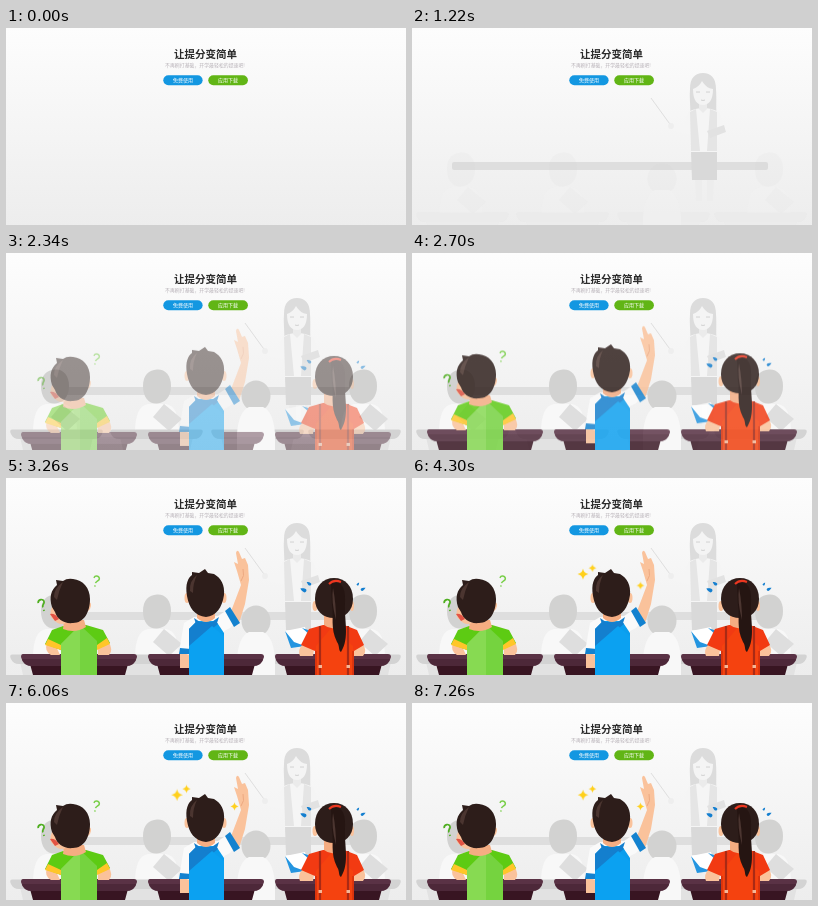
These frames come from a looping animation (400x197 px, 8000 ms). An HTML page:

```html
<!DOCTYPE html>
<html>
<head>
<meta charset="utf-8">
<title>Classroom</title>
<style>
  html, body { margin: 0; width: 100%; height: 100%; overflow: hidden; background: #f5f5f5; }
  svg { display: block; width: 100%; height: 100%; }
  text { font-family: "Noto Sans CJK SC", "Noto Sans CJK", sans-serif; text-anchor: middle; }

  .board { animation: board 8s step-end infinite; }
  .back { animation: back-fade 8s linear infinite, back-rise 8s linear infinite; }
  .front { animation: front-fade 8s linear infinite, front-rise 8s linear infinite; }
  .sparks { animation: spark-fade 8s linear infinite, spark-rise 8s linear infinite; }
  .spark { animation: pulse 8s ease-in-out infinite; }
  .skin { fill: #fac29b; }
  .hair { fill: #2d1d1a; }
  .shine { fill: #4b3530; }

  @keyframes board {
    0% { opacity: 0 } 6.25% { opacity: .55 } 6.75% { opacity: .8 } 9.75%, 100% { opacity: 1 }
  }
  @keyframes back-fade { 0%, 14.25% { opacity: 0 } 23.75%, 100% { opacity: 1 } }
  @keyframes back-rise {
    0%, 14.25% { transform: translateY(10px); animation-timing-function: cubic-bezier(.33, .67, .67, 1) }
    23.75%, 100% { transform: none }
  }
  @keyframes front-fade { 0%, 23.75% { opacity: 0 } 35.75%, 100% { opacity: 1 } }
  @keyframes front-rise {
    0%, 23.75% { transform: translateY(10px); animation-timing-function: cubic-bezier(.33, .67, .67, 1) }
    35.75%, 100% { transform: none }
  }
  @keyframes spark-fade { 0%, 40.75% { opacity: 0 } 50.75%, 100% { opacity: 1 } }
  @keyframes spark-rise {
    0%, 40.25% { transform: translateY(24px); animation-timing-function: cubic-bezier(.33, .67, .67, 1) }
    63.25%, 100% { transform: none }
  }
  @keyframes pulse {
    0%, 61.75% { transform: none }
    65.75%, 68.25% { transform: scale(.95) }
    75.75%, 83.75% { transform: scale(1.06) }
    90.75%, 100% { transform: scale(.98) }
  }
</style>
</head>
<body>
<svg viewBox="0 0 400 197" preserveAspectRatio="none">
  <defs>
    <linearGradient id="wall" x2="0" y2="1">
      <stop stop-color="#fdfdfd"/>
      <stop offset="1" stop-color="#ededed"/>
    </linearGradient>
    <path id="star" d="M0-5.5Q.9-.9 5.5 0Q.9.9 0 5.5Q-.9.9-5.5 0Q-.9-.9 0-5.5Z" fill="#ffd01c"/>
    <path id="ask" d="M-3-3C-2-7 4-6 3-2C2 0 0 0 0 2.500M0 5v1.300" fill="none" stroke-width="1.700"/>
    <path id="drop" d="M0-3.500C2.500 0 2.500 3 0 3S-2.500 0 0-3.500Z" fill="#147fd0"/>
    <g id="desk">
      <path d="M9 186H107L104 197H12Z" fill="#381522"/>
      <path d="M2 176H113Q116 176 116 179Q114 188 105 188H11Q2 188 0 179Q0 176 2 176Z" fill="#5a3245"/>
      <path d="M1 181H115Q113 188 105 188H11Q3 188 1 181Z" fill="#4d2839"/>
    </g>
    <g id="back-desk">
      <path d="M10 184H83L80 197H13Z" fill="#e2e2e2"/>
      <path d="M2 176.500H91Q94 177 92 181Q90 186 84 186H9Q3 186 1 181Q-1 177 2 176.500Z" fill="#d3d3d3"/>
    </g>
    <g id="pupil">
      <path d="M-22 180Q-22 153-9 151H9Q22 153 22 180Z" fill="#f8f8f8"/>
      <path d="M7 151L25 166L12 178L-4 164Z" fill="#dedede"/>
      <path d="M-14 133C-14 122-8 117 0 116.500S14 122 14 133S8 150 0 150.500S-14 145-14 133Z" fill="#d2d2d1"/>
    </g>
  </defs>

  <rect width="400" height="197" fill="url(#wall)"/>

  <g class="board">
    <rect x="40" y="134" width="316" height="8" rx="2" fill="#dedede"/>
    <path d="M283 150H290V173H284ZM295 150H302L301 173H295Z" fill="#ededed"/>
    <path d="M277 97C280 82 277 75 278 61C278 50 283 45 291 45S304 50 304 61C305 76 303 82 306 97Z" fill="#dcdcdc"/>
    <path d="M276 84Q291 76 307 84L314 103L305 112V126H279L278 107L258 101L260 95L272 98Z" fill="#f5f5f5"/>
    <path d="M278 84L284 81L288 123H279Z M298 81L305 84V123H295Z" fill="#e5e5e5"/>
    <path d="M287 72H295V81L291 85L287 81Z" fill="#ebebeb"/>
    <path d="M281 61Q287 59 290 53Q294 60 301 61C301 72 297 77 291 77S281 72 281 61Z" fill="#f4f4f4"/>
    <path d="M284 64H288M294 64H298M289 72Q291 73 293 72" fill="none" stroke="#d2d2d2"/>
    <path d="M239 70L260 99" stroke="#d8d8d8" stroke-width=".8"/>
    <circle cx="259" cy="98" r="3" fill="#eee"/>
    <path d="M295 103L312 97L314 104L298 110Z" fill="#e2e2e2"/>
    <path d="M279 124H305V152H280Z" fill="#d9d9d9"/>
  </g>

  <g class="back">
    <use href="#pupil" x="49"/>
    <use href="#pupil" x="151"/>
    <use href="#pupil" x="357"/>
    <use href="#back-desk" x="4"/>
    <use href="#back-desk" x="104"/>
    <use href="#back-desk" x="205"/>
    <use href="#back-desk" x="302"/>
    <ellipse cx="250" cy="143" rx="14.500" ry="15.500" fill="#d2d2d1"/>
    <path d="M231 180Q233 158 243 154H257Q267 158 269 180V197H231Z" fill="#f8f8f8"/>
  </g>

  <g class="front">
    <use href="#desk" x="15"/>
    <use href="#desk" x="142"/>
    <use href="#desk" x="269"/>

    <!-- puzzled boy -->
    <path class="skin" d="M41 165L50 168L54 177H45Q38 173 41 165ZM92 168L102 163Q108 172 103 177H92Z"/>
    <path d="M57 148L46 152L39 166L55 172V197H91V171L104 165L97 152L80 147Z" fill="#5dcb13"/>
    <path d="M39 167L42 161L55 167V172ZM91 172V167L101 160L104 166Z" fill="#ffc629"/>
    <path d="M55 166L74 147L91 163V197H55Z" fill="#75d33f"/>
    <path d="M55 166L74 147V197H55Z" fill="#87da52"/>
    <path d="M58 142H78L80 149Q69 156 57 151Z" fill="#f5ad82"/>
    <path class="skin" d="M46 129Q42 138 48 142Q54 149 62 144L58 130ZM82 124Q87 124 84 131L81 134Z"/>
    <path d="M44 136Q49 135 53 141L49 143Z" fill="#e25344"/>
    <path class="hair" d="M46 129C43 119 45 112 51 107L50 102L57 103Q61 100 67 101C77 102 84 110 84 121C84 134 78 145 67 145C58 146 51 141 49 134Z"/>
    <path class="shine" d="M48 119Q48 110 57 104Q53 112 51 122Z"/>
    <use href="#ask" transform="translate(90 103) rotate(12) scale(.9)" stroke="#79cf49"/>
    <use href="#ask" transform="translate(36 127) rotate(-20)" stroke="#4fae20"/>

    <!-- boy with raised hand -->
    <path class="skin" d="M224 136L235 107L231 93L228 84L232 86L230 75Q231 71 233 74L236 81L239 80L242 87L243 102L239 126L233 145Z"/>
    <path d="M235 103Q239 98 237 91" fill="none" stroke="#eda981"/>
    <path class="skin" d="M174 176H184V190H174Z"/>
    <path d="M188 139L178 145L173 174L184 177V197H218V153L224 150L229 144L221 132L212 138Z" fill="#fafafa"/>
    <path d="M219 133L224 129L234 145L228 149ZM174 170L185 171V176H173Z" fill="#1482cf"/>
    <path d="M183 151L191 143H210L218 155V197H183Z" fill="#0a9ded"/>
    <path d="M183 151L190 144H210L212 146L183 170Z" fill="#147fce"/>
    <path d="M183 168L206 148L218 158V197H183Z" fill="#0ba1f1"/>
    <path d="M188 140L200 148L213 139L211 145L200 151L190 146Z" fill="#147fce"/>
    <path d="M191 131H209V140Q200 148 191 140Z" fill="#f5ad82"/>
    <ellipse class="skin" cx="181" cy="120" rx="2.500" ry="5"/>
    <ellipse class="skin" cx="218" cy="120" rx="2.500" ry="5"/>
    <path class="hair" d="M181 118C179 106 182 100 186 97L186 94L193 95L199 91L202 95L208 96C215 100 219 107 218 117C216 130 210 138 200 139C189 138 183 130 181 118Z"/>
    <path class="shine" d="M184 113Q183 103 191 97Q187 105 187 115Z"/>

    <!-- girl -->
    <path d="M279 153L299 149L303 164L285 169Z" fill="#fff"/>
    <path d="M279 153L288 164L299 168L285 170ZM296 150L305 153L303 156Z" fill="#2495e0"/>
    <path class="skin" d="M297 166L308 171L307 178H294Q291 172 297 166ZM347 171L356 165Q362 173 357 178H347Z"/>
    <path d="M317 147L303 151L295 167L309 173V197H348V173L358 167L351 152L338 147Z" fill="#f23a12"/>
    <path d="M310 168L326 149L347 168V197H310Z" fill="#f5420f"/>
    <path d="M310 173V197M347 173V197" stroke="#c22a0a"/>
    <path d="M314 148V197M342 148V197" stroke="#a92a15" stroke-width="2.200"/>
    <path d="M312.500 187H316V190H312.500ZM340.500 187H344V190H340.500Z" fill="#f4b798"/>
    <path d="M318 137H336V146Q327 154 318 147Z" fill="#f5ad82"/>
    <ellipse class="skin" cx="309" cy="128" rx="2.500" ry="5"/>
    <ellipse class="skin" cx="346" cy="128" rx="2" ry="5"/>
    <path class="hair" d="M309 121C309 108 317 100 328 100S347 108 347 121C347 133 339 140 328 140S309 133 309 121Z"/>
    <path d="M325 106C335 101 340 110 339 125C338 142 344 160 335 174C332 172 334 168 331 164C324 150 328 138 326 128Z" fill="#251512"/>
    <path class="shine" d="M327 110Q330 125 330 142Q325 123 327 110Z"/>
    <path d="M323 106Q328 101 335 104" fill="none" stroke="#ed3720" stroke-width="2"/>
    <use href="#drop" transform="translate(297.500 112) rotate(-65)"/>
    <use href="#drop" transform="translate(303 105.500) rotate(-55) scale(.8)"/>
    <use href="#drop" transform="translate(357 111) rotate(65) scale(.8)"/>
    <use href="#drop" transform="translate(352 106) rotate(35) scale(.55)"/>
  </g>

  <g class="sparks">
    <g transform="translate(171 92)"><use class="spark" href="#star"/></g>
    <g transform="translate(180.500 86) scale(.7)"><use class="spark" href="#star"/></g>
    <g transform="translate(228.500 103.500) scale(.7)"><use class="spark" href="#star"/></g>
  </g>

  <text x="199.500" y="30.300" font-size="10.500" font-weight="700" fill="#2b2b2b">让提分变简单</text>
  <text x="199" y="39" font-size="4.900" fill="#b8b2b8">不再刷打基础，开学最轻松的提速吧!</text>
  <g font-size="5" font-weight="500" fill="#fff">
    <rect x="157.300" y="47.200" width="39.300" height="10" rx="5" fill="#1397e1"/>
    <text x="177" y="54">免费使用</text>
    <rect x="202.300" y="47.200" width="39.600" height="10" rx="5" fill="#61b515"/>
    <text x="222" y="54">应用下载</text>
  </g>
</svg>
</body>
</html>
```
